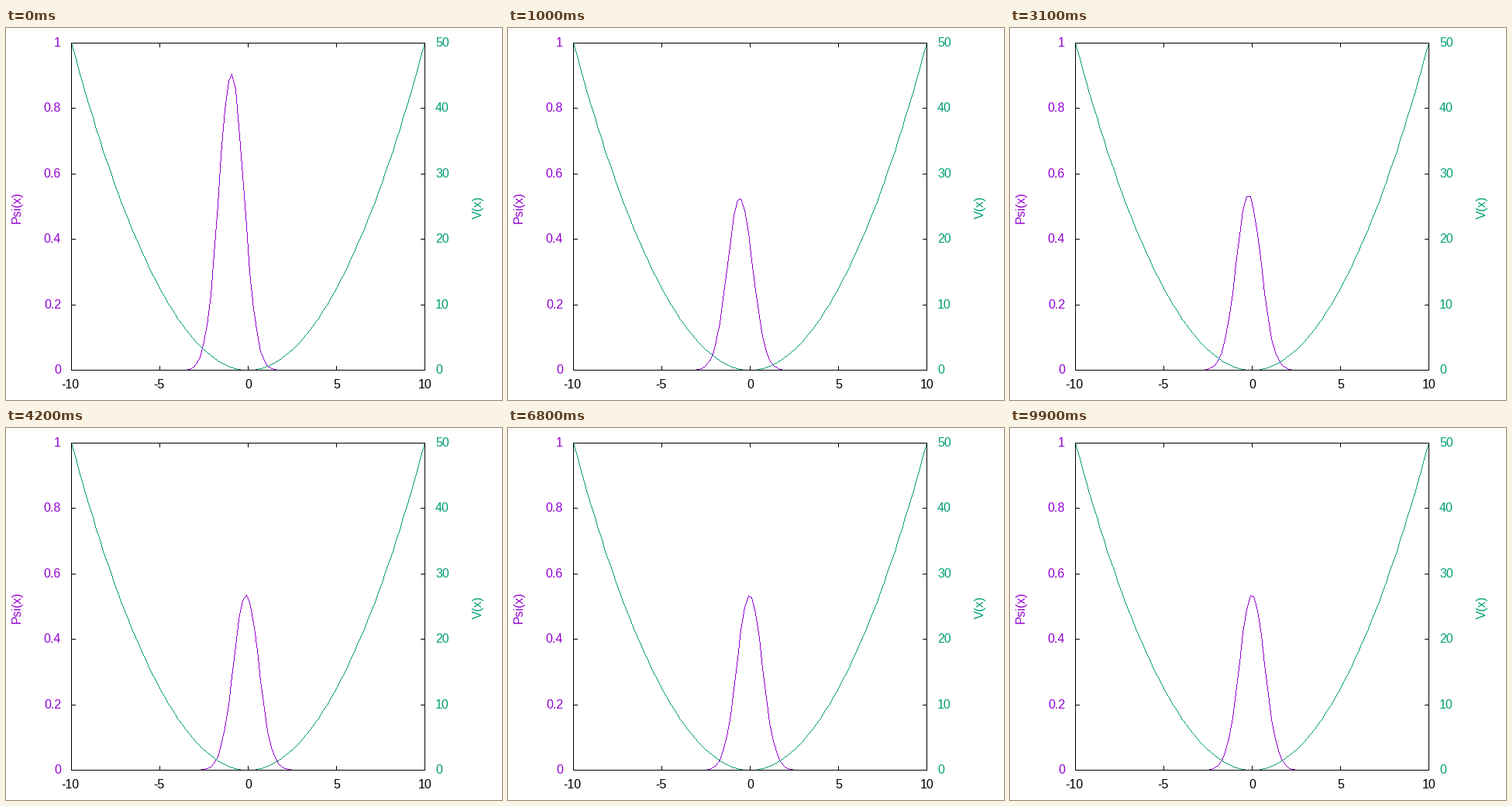
A matplotlib script for the animation above (10000 ms loop, 640 px wide and 480 px high).

```python
import numpy as np
import matplotlib.pyplot as plt
from matplotlib.animation import FuncAnimation

W, H, DPI = 640, 480, 100
LEFT, RIGHT, TOP, BOTTOM = 84, 540, 19, 441
FRAMES, DT, TIC = 100, 0.05, 5
PURPLE, GREEN, BLACK = (148, 0, 211), (0, 158, 115), (0, 0, 0)

x = np.linspace(-10, 10, 100)
dx = x[1] - x[0]
potential = x**2 / 2


def evolve():
    """Imaginary-time split-step relaxation in a harmonic well."""
    k = 2 * np.pi * np.fft.fftfreq(x.size, dx)
    half_v = np.exp(-potential * DT / 2)
    kinetic = np.exp(-k**2 * DT / 2)
    psi = np.exp(-(x + 1)**2 / 2)
    out = []
    for _ in range(FRAMES):
        psi = half_v * np.fft.ifft(kinetic * np.fft.fft(half_v * psi)).real
        density = psi**2
        out.append(density)
        psi = psi / np.sqrt(density.sum() * dx)
    return out


def to_px(v):
    return LEFT + np.floor((v + 10) / 20 * (RIGHT - LEFT) + 0.5).astype(int)


def to_py(v):
    return BOTTOM - np.floor(v * (BOTTOM - TOP) + 0.5).astype(int)


def segment(img, x0, y0, x1, y1, color):
    """Hard-edged line, one pixel wide."""
    steep = abs(y1 - y0) > abs(x1 - x0)
    a, b = ((y0, x0), (y1, x1)) if steep else ((x0, y0), (x1, y1))
    if a[0] > b[0]:
        a, b = b, a
    run, rise = b[0] - a[0], b[1] - a[1]
    i = np.arange(run + 1)
    j = a[1] + np.sign(rise) * ((2 * abs(rise) * i + run) // max(2 * run, 1))
    i = i + a[0]
    if steep:
        img[i, j] = color
    else:
        img[j, i] = color


def curve(img, values, color):
    px, py = to_px(x), to_py(values)
    for p in zip(px[:-1], py[:-1], px[1:], py[1:]):
        segment(img, *p, color)


def border(img):
    img[[TOP, BOTTOM], LEFT:RIGHT + 1] = BLACK
    img[TOP:BOTTOM + 1, [LEFT, RIGHT]] = BLACK


x_tics = [(v, to_px(v)) for v in range(-10, 11, 5)]
y_tics = [(n, to_py(n / 5)) for n in range(6)]

base = np.full((H, W, 3), 255, np.uint8)
for _, px in x_tics:
    base[TOP:TOP + TIC + 1, px] = BLACK
    base[BOTTOM - TIC:BOTTOM + 1, px] = BLACK
for _, py in y_tics:
    base[py, LEFT:LEFT + TIC + 1] = BLACK
    base[py, RIGHT - TIC:RIGHT + 1] = BLACK

plt.rcParams["font.family"] = "Liberation Sans"
plt.rcParams["font.size"] = 16 * 72 / DPI

fig = plt.figure(figsize=(W / DPI, H / DPI), dpi=DPI)
ax = fig.add_axes([0, 0, 1, 1])
ax.axis("off")
picture = ax.imshow(base, extent=(0, W, H, 0), aspect="auto",
                    interpolation="nearest")


def label(px, py, text, color, ha, **kw):
    rgb = tuple(c / 255 for c in color)
    ax.text(px, py, text, color=rgb, ha=ha, va="baseline", **kw)


for v, px in x_tics:
    label(px + 0.5 - (1.5 if v < 0 else 0), 465, str(v), BLACK, "center")
for n, py in y_tics:
    label(71, py + 5, f"{n / 5:g}", PURPLE, "right")
    label(554, py + 5, str(10 * n), GREEN, "left")
for px, text, color in ((19, "Psi(x)", PURPLE), (614, "V(x)", GREEN)):
    label(px, 231, text, color, "right", rotation=90,
          rotation_mode="anchor") if False else ax.text(
        px, 231, text, color=tuple(c / 255 for c in color), rotation=90,
        rotation_mode="anchor", ha="center", va="baseline")

densities = evolve()


def draw(frame):
    img = base.copy()
    curve(img, densities[frame], PURPLE)
    curve(img, potential / 50, GREEN)
    border(img)
    picture.set_data(img)
    return [picture]


anim = FuncAnimation(fig, draw, frames=FRAMES, interval=100, repeat=True,
                     repeat_delay=0)
plt.show()
```
